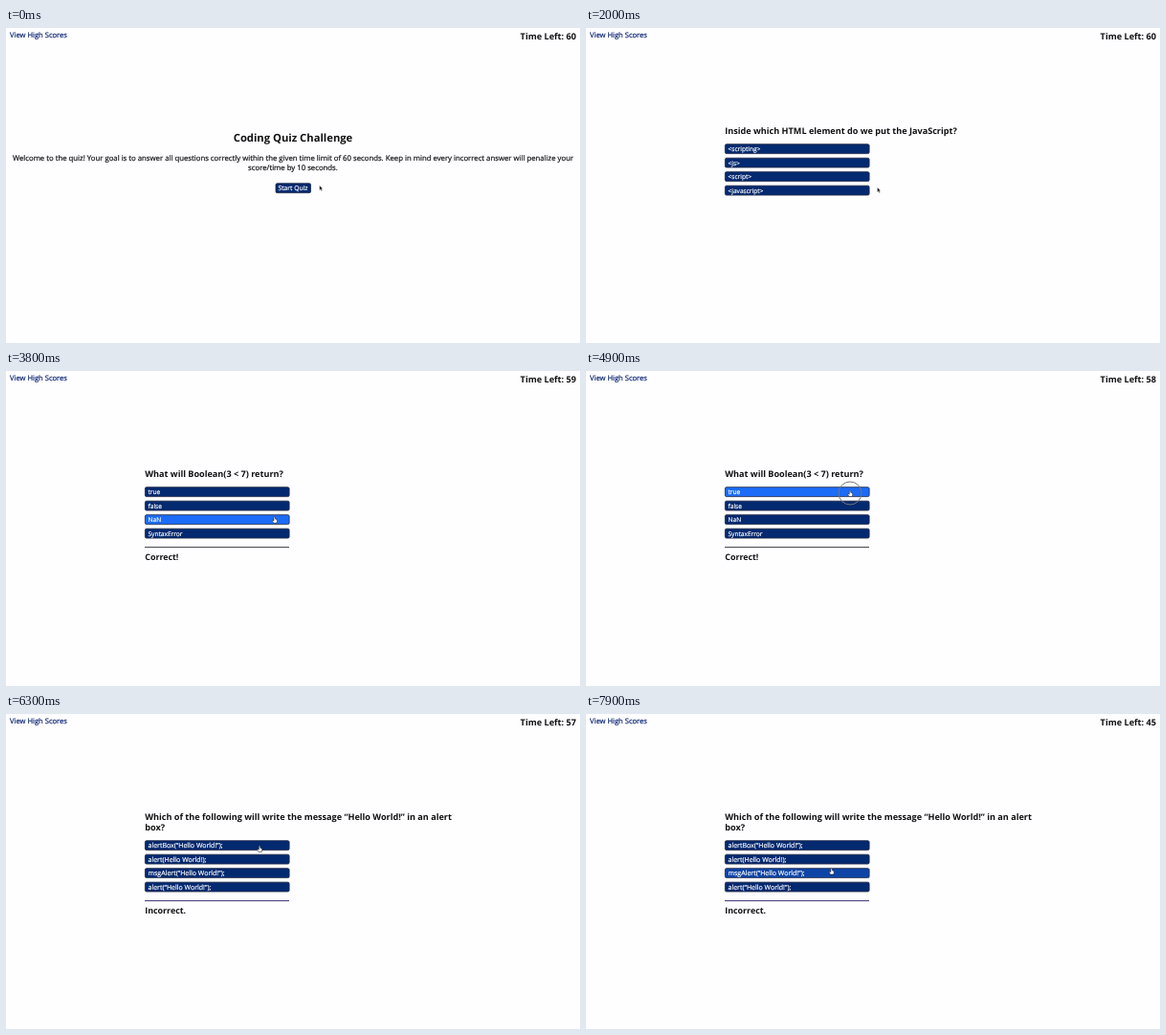
An HTML page that plays this animation: 600x330 px, repeating every 8000 ms.

```html
<!DOCTYPE html>
<html lang="en">
<head>
<meta charset="utf-8">
<title>Coding Quiz Challenge</title>
<style>
html, body { margin: 0; width: 100%; height: 100%; overflow: hidden; background: #fefdff; }
svg { display: block; width: 600px; height: 330px; }
text { font-family: "Open Sans", "Noto Sans", sans-serif; text-rendering: geometricPrecision; white-space: pre; }
</style>
</head>
<body>
<svg id="stage" viewBox="0 0 600 330"></svg>
<script>
const LOOP = 8000, STEP = 100, FADE_STEPS = 5, PRESS = 200;
const FIRST_TICK = 2700, FEEDBACK_TIME = 2000;
const NAVY = [3, 41, 112], BLUE = [28, 108, 248];
const BUTTON = { x: 145, w: 151.5, h: 10.7, gap: 14.5 };
const stage = document.getElementById('stage');

const scenes = [
  { start: 0 },
  {
    start: 1700, title: ['Inside which HTML element do we put the JavaScript?'],
    options: ['<scripting>', '<js>', '<script>', '<javascript>'], size: 6.6
  },
  {
    start: 3200, title: ['What will Boolean(3 < 7) return?'],
    options: ['true', 'false', 'NaN', 'SyntaxError'], size: 6.6,
    feedback: 'Correct!', rule: '#333'
  },
  {
    start: 6300, title: ['Which of the following will write the message “Hello World!” in an alert', 'box?'],
    options: ['alertBox(“Hello World!”);', 'alert(Hello World!);', 'msgAlert(“Hello World!”);', 'alert(“Hello World!”);'], size: 7,
    feedback: 'Incorrect.', rule: '#30286f'
  }
];

// Where the pointer rests, and when a press there ends.
const stops = [
  { x: 327.7, y: 165, arrive: 0, leave: 300 },
  { x: 304.5, y: 167, arrive: 1300, leave: 2100, release: 1700 },
  { x: 280.7, y: 152.7, arrive: 2900, leave: 3800, release: 3200 },
  { x: 276, y: 125, arrive: 4400, leave: 5000, release: 5000 },
  { x: 265, y: 138, arrive: 5700, leave: 6300, release: 6300 },
  { x: 258, y: 179, arrive: 7200, leave: 7500 },
  { x: 256.5, y: 161.5, arrive: 7900, leave: LOOP }
];

const clamp = v => Math.max(0, Math.min(1, v));
const escape = s => s.replace(/&/g, '&amp;').replace(/</g, '&lt;');
const sceneAt = t => scenes.findLast(s => t >= s.start);
const shiftOf = scene => (scene.title.length - 1) * 11;

function pointerAt(t) {
  const i = stops.findLastIndex(s => t >= s.arrive);
  const a = stops[i], b = stops[i + 1] || a;
  const u = b === a ? 0 : clamp((t - a.leave) / (b.arrive - a.leave));
  const e = u * u * (3 - 2 * u);
  return { x: a.x + (b.x - a.x) * e, y: a.y + (b.y - a.y) * e };
}

const inside = (p, x, y, w) => p.x >= x && p.x <= x + w && p.y >= y && p.y <= y + BUTTON.h;

// Index of the button under the pointer, or -1.
function hovered(scene, t) {
  const p = pointerAt(t);
  if (!scene.title) return inside(p, 281.6, 162.4, 37.3) ? 0 : -1;
  return scene.options.findIndex((_, i) => inside(p, BUTTON.x, optionY(scene, i), BUTTON.w));
}

const optionY = (scene, i) => 121.3 + shiftOf(scene) + i * BUTTON.gap;

// A button lights up gradually while the pointer stays on it.
function glowOf(scene, index, t) {
  let n = 0;
  while (n <= FADE_STEPS && t - n * STEP >= scene.start && hovered(scene, t - n * STEP) === index) n++;
  return clamp((n - 1) / FADE_STEPS);
}

function text(x, y, size, str, { fill = '#111', bold = false, anchor = 'start' } = {}) {
  const weight = bold ? 'font-weight="700"' : `stroke="${fill}" stroke-width=".2"`;
  return `<text x="${x}" y="${y}" font-size="${size}" fill="${fill}" ${weight} text-anchor="${anchor}">${escape(str)}</text>`;
}

function button(x, y, w, glow = 0) {
  const color = NAVY.map((c, i) => Math.round(c + (BLUE[i] - c) * glow));
  return `<rect x="${x + .4}" y="${y + .4}" width="${w - .8}" height="${BUTTON.h - .8}" rx="1.5" fill="rgb(${color})" stroke="#1c2540" stroke-width=".8"/>`;
}

function drawIntro() {
  const mid = { anchor: 'middle' };
  return text(300, 119, 11.22, 'Coding Quiz Challenge', { bold: true, ...mid }) +
    text(300, 139.3, 7.78, 'Welcome to the quiz! Your goal is to answer all questions correctly within the given time limit of 60 seconds. Keep in mind every incorrect answer will penalize your', mid) +
    text(300, 148.6, 7.78, 'score/time by 10 seconds.', mid) +
    button(281.6, 162.4, 37.3) +
    text(300, 170.2, 6.75, 'Start Quiz', { fill: '#fff', ...mid });
}

function drawQuestion(scene, t) {
  const shift = shiftOf(scene);
  let out = scene.title.map((line, i) => text(145.3, 111 + i * 11, 9.1, line, { bold: true })).join('');
  scene.options.forEach((label, i) => {
    const y = optionY(scene, i);
    out += button(BUTTON.x, y, BUTTON.w, glowOf(scene, i, t)) +
      text(148.5, y + 7.8, scene.size, label, { fill: '#fff' });
  });
  if (scene.feedback && t < scene.start + FEEDBACK_TIME) {
    out += `<path d="M145 ${184.7 + shift}H296" stroke="${scene.rule}"/>` +
      text(145.3, 198 + shift, 8.85, scene.feedback, { bold: true });
  }
  return out;
}

function drawPointer(scene, t) {
  const { x, y } = pointerAt(t);
  const shape = hovered(scene, t) >= 0
    ? '<path d="M-.7.5Q0-.4.7.5V2.3L2.6 3Q3 5 2.2 6.5H-1L-2.4 4.2-1.8 3.5-.7 4.2Z" fill="#fff" stroke="#111" stroke-width=".5"/>'
    : '<path d="M0 0V5L1.2 3.9 2.1 5.8 2.9 5.4 2 3.6H3.5Z" fill="#111" stroke="#fff" stroke-width=".3"/>';
  const pressed = stops.some(s => t >= s.release - PRESS && t < s.release);
  const ring = pressed ? '<circle cy="3" r="12" fill="none" stroke="#777"/>' : '';
  return `<g transform="translate(${x} ${y})">${ring}${shape}</g>`;
}

// The penalty for a wrong answer shows at the next tick.
function timeLeft(t) {
  const seconds = Math.max(0, Math.floor((t - FIRST_TICK) / 1000));
  const wrong = scenes.find(s => s.feedback === 'Incorrect.');
  return 60 - seconds - (FIRST_TICK + seconds * 1000 > wrong.start ? 10 : 0);
}

function render(t) {
  const scene = sceneAt(t);
  stage.innerHTML =
    text(4, 10.4, 7.6, 'View High Scores', { fill: '#0a2472' }) +
    text(596, 11.5, 9.17, 'Time Left: ' + timeLeft(t), { bold: true, anchor: 'end' }) +
    (scene.title ? drawQuestion(scene, t) : drawIntro()) +
    drawPointer(scene, t);
}

const start = performance.now();
let shown = -1;
function frame() {
  const t = Math.floor((performance.now() - start) % LOOP / STEP) * STEP;
  if (t !== shown) render(shown = t);
  requestAnimationFrame(frame);
}
frame();
</script>
</body>
</html>
```
